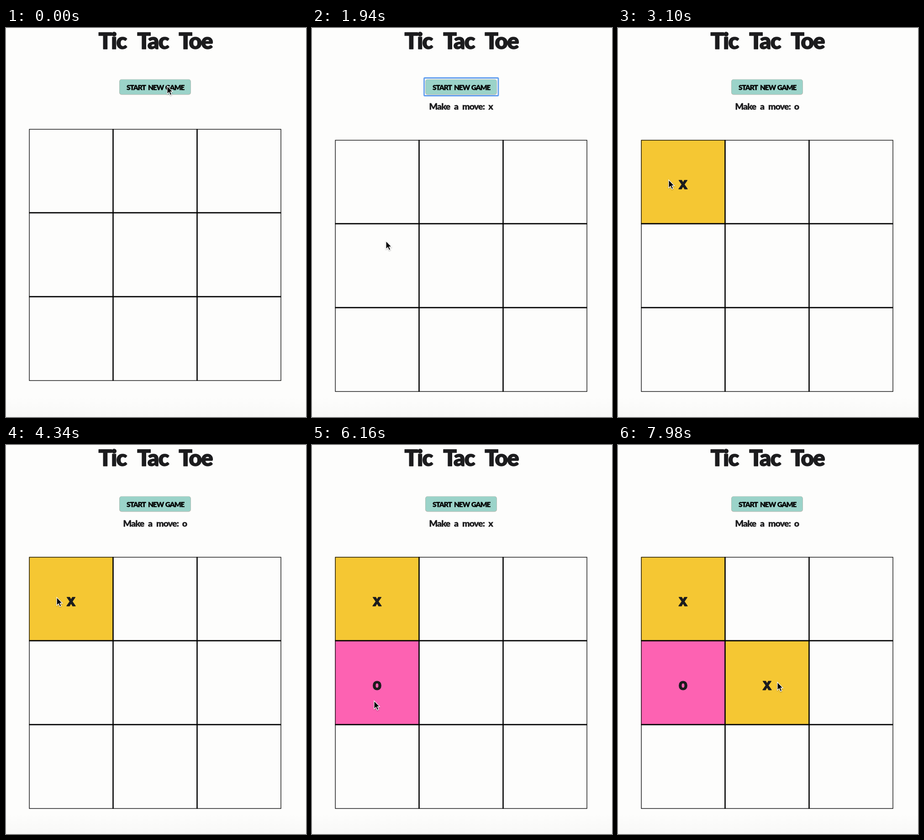
An HTML page that plays this animation: 657x853 px, repeating every 8000 ms.

```html
<!DOCTYPE html>
<html lang="en">
<head>
<meta charset="utf-8">
<title>Tic Tac Toe</title>
<style>
  html, body { margin: 0; width: 100%; height: 100%; overflow: hidden; background: #fdfdfc; }
  svg { display: block; width: 100%; height: 100%; }
  text {
    font-family: Lato, "Open Sans", sans-serif;
    font-weight: 900;
    text-anchor: middle;
    fill: #1c1c1e;
    stroke: #1c1c1e;
    stroke-linejoin: round;
  }
  .title { font-size: 49px; letter-spacing: -1.8px; stroke-width: 1.4px; }
  .button { font-size: 15.5px; letter-spacing: -1.1px; stroke-width: .3px; fill: #000; stroke: #000; }
  .status { font-size: 19.5px; letter-spacing: -.9px; stroke-width: .3px; }
  .mark { font: bold 34px "DejaVu Sans Mono", monospace; stroke-width: 1.6px; }
</style>
</head>
<body>
<svg viewBox="0 0 657 853" preserveAspectRatio="none">
  <defs>
    <linearGradient id="fade" x1="0" y1="0" x2="0" y2="1">
      <stop offset="0" stop-color="#fdfdfc"/>
      <stop offset="1" stop-color="#f8f8f7"/>
    </linearGradient>
    <filter id="soft" x="-50%" y="-50%" width="200%" height="200%">
      <feDropShadow dx="0" dy="1.2" stdDeviation="1" flood-opacity=".35"/>
    </filter>
  </defs>
  <rect width="657" height="853" fill="#fdfdfc"/>
  <rect y="810" width="657" height="43" fill="url(#fade)"/>
  <g id="labels"></g>
  <g id="board"></g>
  <path id="cursor" filter="url(#soft)" fill="#000" stroke="#fff" stroke-width="1.2"
        d="M0 0V17.6L4.1 13.9 6.8 20.2 9.9 18.9 7.2 12.8H12.3Z"/>
</svg>
<script>
const LOOP = 8000, SIZE = 184, LEFT = 50.5, TOP = 221.5;
const INK = "#000";
const COLORS = { x: "#f5c733", o: "#fd62b2" };

const START = 500;
const MOVES = [
  { t: 2650, cell: 0, mark: "x" },
  { t: 6020, cell: 3, mark: "o" },
  { t: 7500, cell: 4, mark: "x" }
];

// Pointer stops: time, x, y
const STOPS = [
  [0, 353, 127], [1250, 353, 127], [1940, 162, 467], [2450, 111, 333],
  [4300, 111, 333], [5300, 136, 561], [6300, 136, 561],
  [7000, 348, 519], [7400, 349, 520], [LOOP, 349, 520]
];

const byId = id => document.getElementById(id);

function add(parent, tag, attrs, text = "") {
  const el = document.createElementNS("http://www.w3.org/2000/svg", tag);
  for (const key in attrs) el.setAttribute(key, attrs[key]);
  el.textContent = text;
  return parent.appendChild(el);
}

// Places each word around its own centre
function words(line, centers, y, name) {
  return line.split(" ").map((word, i) =>
    add(labels, "text", { x: centers[i], y, class: name }, word));
}

const show = (el, on) => el.setAttribute("visibility", on ? "visible" : "hidden");

const labels = byId("labels"), board = byId("board"), cursor = byId("cursor");

words("Tic Tac Toe", [233, 321.5, 415], 46, "title");

const ring = add(labels, "rect", {
  x: 245.5, y: 109.5, width: 162.5, height: 39, rx: 1.5,
  fill: "#fdfdfc", stroke: "#639fee", "stroke-width": 2.8
});
add(labels, "rect", { x: 248, y: 112.5, width: 157, height: 34, rx: 5, fill: "#b9b6ad" });
add(labels, "rect", { x: 248.7, y: 113, width: 155.6, height: 32.4, rx: 4.5, fill: "#9bd3c9" });
words("START NEW GAME", [285, 328, 369.5], 136, "button");

const status = words("Make a move: x", [279.5, 315.5, 353.5, 391], 179, "status");
const turn = status[3];

const cells = Array.from({ length: 9 }, (_, i) => {
  const x = LEFT + (i % 3) * SIZE, y = TOP + Math.floor(i / 3) * SIZE;
  return {
    fill: add(board, "rect", { x, y, width: SIZE, height: SIZE, fill: "none" }),
    mark: add(board, "text", { x: x + SIZE / 2, y: y + 107, class: "mark" })
  };
});
add(board, "rect", {
  x: LEFT + .6, y: TOP + .6, width: 551, height: 551,
  fill: "none", stroke: INK, "stroke-width": 1.3
});
for (const k of [1, 2]) {
  const x = LEFT + k * SIZE, y = TOP + k * SIZE - .4;
  add(board, "path", {
    d: `M${x} ${TOP}v552M${LEFT} ${y}h552`,
    fill: "none", stroke: INK, "stroke-width": 2.6
  });
}

function pointer(t) {
  const i = STOPS.findIndex(s => s[0] > t);
  const [t0, x0, y0] = STOPS[i - 1], [t1, x1, y1] = STOPS[i];
  const p = (t - t0) / (t1 - t0), e = p * p * (3 - 2 * p);
  return [x0 + (x1 - x0) * e, y0 + (y1 - y0) * e];
}

function render(t) {
  const started = t >= START;
  const done = MOVES.filter(m => t >= m.t);

  show(ring, started && !done.length);
  status.forEach(el => show(el, started));
  turn.textContent = done.length % 2 ? "o" : "x";
  board.setAttribute("transform", `translate(0 ${started ? 24 : 0})`);

  cells.forEach((cell, i) => {
    const move = done.find(m => m.cell === i);
    cell.fill.setAttribute("fill", move ? COLORS[move.mark] : "none");
    cell.mark.textContent = move ? move.mark : "";
  });

  cursor.setAttribute("transform", `translate(${pointer(t)})`);
}

const begin = performance.now();
function tick() {
  render((performance.now() - begin) % LOOP);
  requestAnimationFrame(tick);
}
tick();
</script>
</body>
</html>
```
